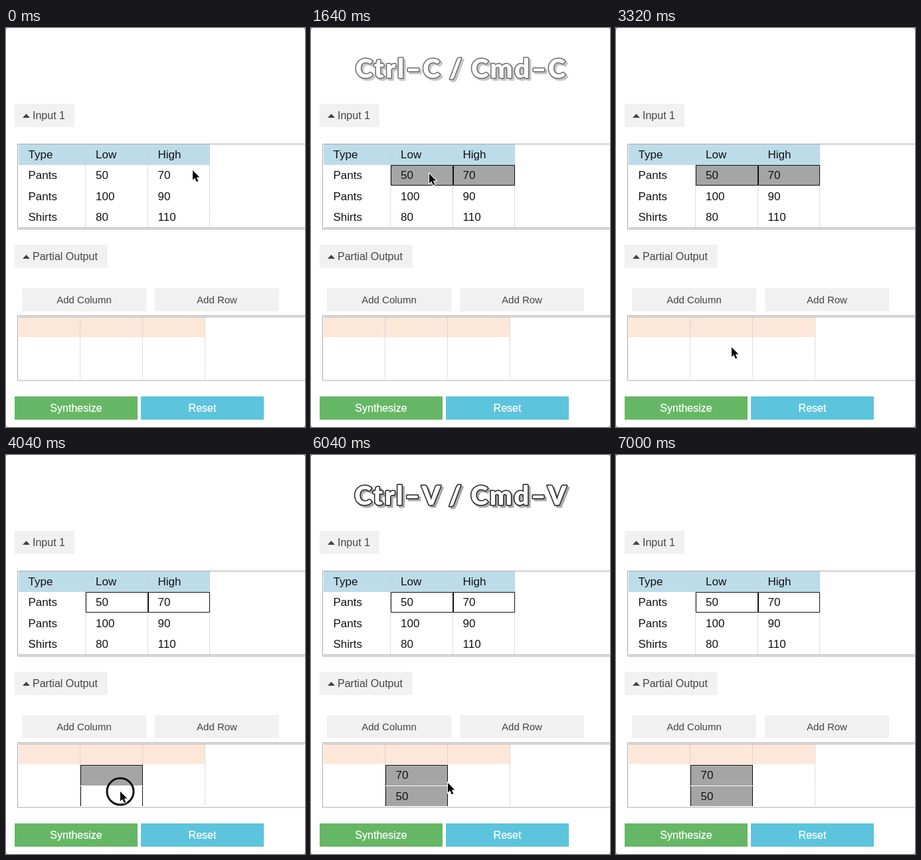
An HTML page that plays this animation: 450 px wide and 600 px high, repeating every 7160 ms.

```html
<!DOCTYPE html>
<html lang="en">
<head>
<meta charset="utf-8">
<title>Copy and paste demo</title>
<style>
  html, body { margin: 0; width: 100%; height: 100%; overflow: hidden; background: #fff; }
  svg { display: block; width: 450px; height: 600px; }
  text { font-family: "Liberation Sans", Arial, sans-serif; font-size: 17px; fill: #111; }
  .label { font-size: 16px; fill: #444; }
  .add { font-size: 15px; fill: #444; text-anchor: middle; }
  .action { font-size: 16px; fill: #fff; stroke: #fff; stroke-width: .25px; text-anchor: middle; }
  .frame { fill: none; stroke: #aaa; }
  .grid { fill: none; stroke: #ccc; stroke-dasharray: 2 1; }
  .edge { fill: none; stroke: #111; }
  #caption {
    font: 900 40px Lato, sans-serif; letter-spacing: 2.3px; text-anchor: middle;
    fill: #fff; stroke: #222; stroke-width: 3px; stroke-linejoin: round; paint-order: stroke;
    filter: drop-shadow(3px 3px .5px #aaa);
  }
</style>
</head>
<body>
<svg viewBox="0 0 450 600">
  <g fill="#f1f1f1">
    <path d="M13 114h90v35h-90zM13 326h140v35h-140zM24 391h187v35h-187zM224 391h187v35h-187z"/>
  </g>
  <path d="M25 135l5.5-6 5.5 6zM25 347l5.5-6 5.5 6z" fill="#444"/>
  <text class="label" x="40" y="137">Input 1</text>
  <text class="label" x="40" y="349">Partial Output</text>
  <text class="add" x="117.5" y="414">Add Column</text>
  <text class="add" x="317.5" y="414">Add Row</text>

  <path d="M19 175h288v31h-288z" fill="#bddcea"/>
  <path d="M19 435h280v30h-280z" fill="#fde7d8"/>
  <path class="grid" d="M119.5 175v125M213.5 175v125M306.5 175v125M111.5 435v93M205.5 435v93M299.5 435v93"/>
  <path class="frame" d="M451 174.500H17.500V302.500H451M19 300.500H451M451 432.500H17.500V530H451M19 434.500H451"/>

  <g id="cells"></g>
  <g id="words"></g>

  <path d="M13 554h185v35h-185z" fill="#66b765"/>
  <path d="M203 554h185v35h-185z" fill="#5cc4dc"/>
  <text class="action" x="105.500" y="577">Synthesize</text>
  <text class="action" x="295.500" y="577">Reset</text>

  <text id="caption" x="226" y="75"></text>
  <g id="pointer">
    <circle id="ring" r="20" fill="none" stroke="#111" stroke-width="3"/>
    <path d="M0 0V14.500L3.300 11.500 5.800 17.300 8.300 16.200 5.800 10.600H10.300Z"
          stroke="#fff" stroke-width="2" paint-order="stroke"/>
  </g>
  <path d="M0 0h3q-3 0-3 3zM450 0v3q0-3-3-3zM0 600v-3q0 3 3 3zM450 600h-3q3 0 3-3z" fill="#777"/>
</svg>
<script>
const LOOP = 7160, STEP = 40;
const $ = id => document.getElementById(id);
const clamp = v => Math.max(0, Math.min(1, v));
const ease = v => (1 - Math.cos(Math.PI * clamp(v))) / 2;

// Selectable cells: fill box, edge path, press time, release time, time the fill clears
const cells = [
  { box: [214, 206, 93, 31], edge: "M214.5 206.5h92v30h-92z", press: 120, release: 360, clear: 3680 },
  { box: [120, 206, 94, 31], edge: "M120.5 206.5h93v30h-93z", press: 1200, release: 1360, clear: 3680 },
  { box: [112, 466, 94, 31], edge: "M112.5 497v-30.5h93v30.5", press: 3680, release: 3840, clear: LOOP },
  { box: [112, 498, 94, 30], edge: "M112.5 498v30M205.500 498v30", press: 4000, release: 4160, clear: LOOP }
];
$("cells").innerHTML = cells.map(({ box: [x, y, w, h], edge }) =>
  `<g><rect x="${x}" y="${y}" width="${w}" height="${h}" fill="#a5a5a5"/><path class="edge" d="${edge}"/></g>`
).join("");

const rows = [["Type", "Low", "High"], ["Pants", 50, 70], ["Pants", 100, 90], ["Shirts", 80, 110]];
const word = (s, x, y) => `<text x="${x}" y="${y}">${s}</text>`;
$("words").innerHTML =
  rows.map((row, r) => row.map((s, c) => word(s, [33.5, 135, 228.5][c], 196 + r * 31.3)).join("")).join("") +
  `<g id="pasted">${word(70, 127.5, 487)}${word(50, 127.5, 519)}</g>`;

// Pointer moves: start, end, destination
const moves = [
  [840, 1200, 178, 219],
  [2760, 3320, 174, 480],
  [3840, 3960, 172, 506],
  [5600, 6280, 219, 488],
  [6440, 7000, 262, 604]
];
const presses = [[120, 360], [1200, 1400], [3680, 3840], [3960, 4200]];
const captions = [
  { text: "Ctrl–C / Cmd–C", start: 1560, end: 2840 },
  { text: "Ctrl–V / Cmd–V", start: 4320, end: 6200 }
];

function pointerAt(t) {
  let x = 281, y = 214;
  for (const [a, b, toX, toY] of moves) {
    const k = ease((t - a) / (b - a));
    x += (toX - x) * k;
    y += (toY - y) * k;
  }
  return [x, y];
}

function show(el, on) {
  el.style.visibility = on ? "visible" : "hidden";
}

function draw() {
  const t = Math.floor(performance.now() % LOOP / STEP) * STEP;
  cells.forEach((cell, i) => {
    const [fill, edge] = $("cells").children[i].children;
    show(fill, t >= cell.release && t < cell.clear);
    show(edge, t >= cell.press);
  });
  show($("pasted"), t >= 4640);

  const caption = captions.find(c => t >= c.start && t < c.end);
  show($("caption"), caption);
  if (caption) {
    $("caption").textContent = caption.text;
    $("caption").style.opacity = clamp(Math.min(t - caption.start, caption.end - t + 20) / 120);
  }

  const [x, y] = pointerAt(t);
  $("pointer").setAttribute("transform", `translate(${x} ${y})`);
  show($("ring"), presses.some(([a, b]) => t >= a && t < b));
  requestAnimationFrame(draw);
}
draw();
</script>
</body>
</html>
```
